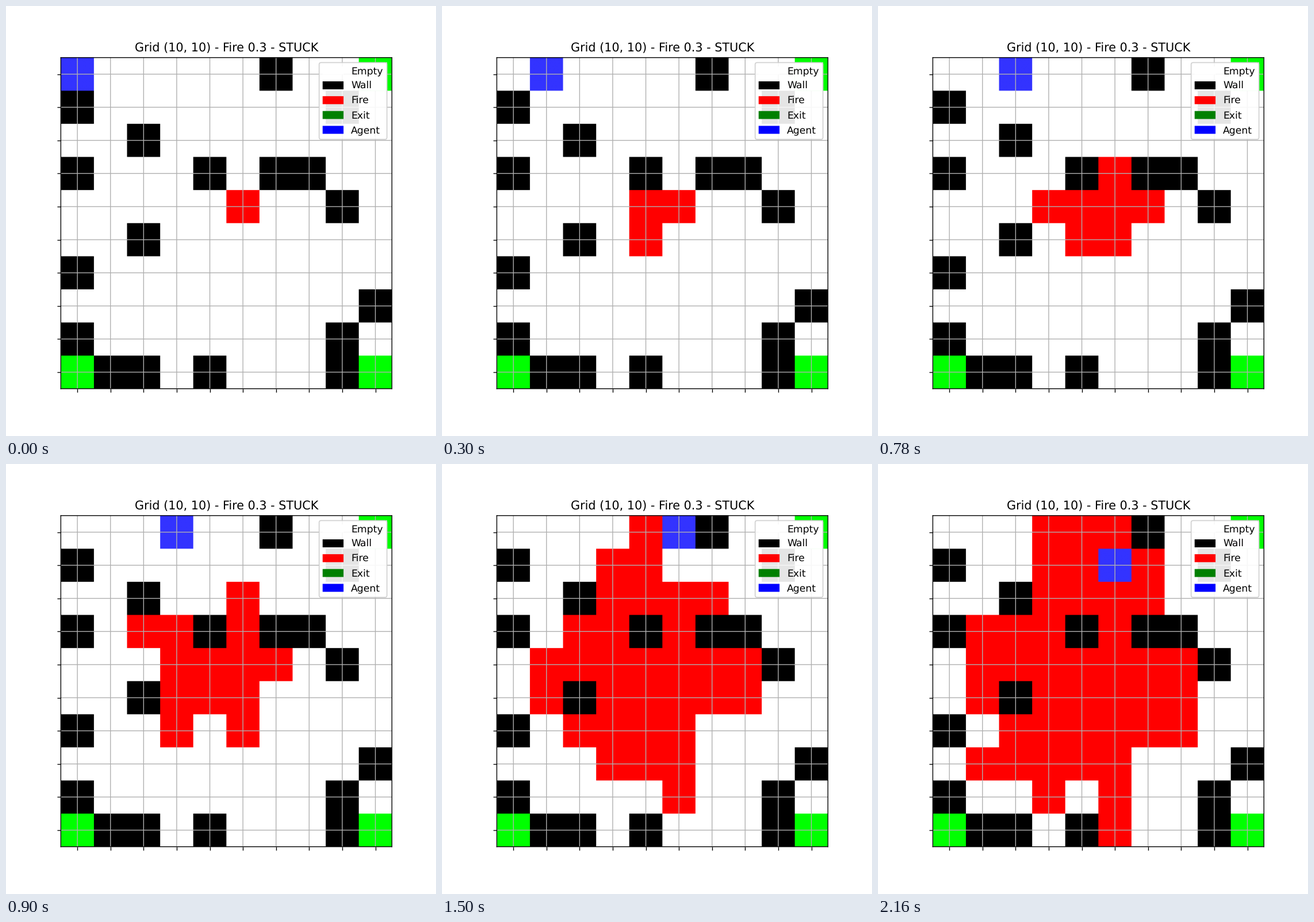
Animation, 748 px wide and 748 px high, one loop 2400 ms. Source, as a matplotlib script:

```python
import numpy as np
import matplotlib.pyplot as plt
from matplotlib.animation import FuncAnimation
from matplotlib.patches import Patch, Rectangle

SIZE, INCHES = 748, 6
STEPS = 7
PAD, SCALE = 2, 50  # margin in cells, samples per cell for soft edges

# '#' wall, 'E' exit, a digit is the step at which the cell catches fire
GRID = [
    "...656#..E",
    "#..5466.#.",
    "..#4434...",
    "#633#2##..",
    ".5421024#.",
    ".5#31245..",
    "#.534366..",
    ".66545...#",
    "#..6.5..#.",
    "E##.#6..#E",
]
N = len(GRID)
EMPTY, WALL, FIRE = (1, 1, 1), (0, 0, 0), (1, 0, 0)
EXIT, AGENT = (0, 1, 0), (0.2, 0.2, 1)


def agent_cell(step):
    """Walk right along the top row, then turn down at column 5."""
    return (0, step) if step <= 5 else (step - 5, 5)


def cell_color(cell, step):
    if cell.isdigit():
        return FIRE if int(cell) <= step else EMPTY
    return {"#": WALL, "E": EXIT}.get(cell, EMPTY)


def render(step):
    img = np.array([[cell_color(c, step) for c in row] for row in GRID], float)
    img[agent_cell(step)] = AGENT
    img = np.pad(img, ((PAD, PAD), (PAD, PAD), (0, 0)), constant_values=1)
    return img.repeat(SCALE, axis=0).repeat(SCALE, axis=1)


plt.rcParams.update({"font.family": "DejaVu Sans", "text.hinting": "none"})
fig, ax = plt.subplots(figsize=(INCHES, INCHES), dpi=SIZE / INCHES)

# The padded board covers the whole figure, so cells keep sub-pixel positions
lo, hi = -0.5 - PAD, N - 0.5 + PAD
board = ax.imshow(render(0), extent=(lo, hi, hi, lo), interpolation="bilinear")
board.set_clip_on(False)
ax.set(xlim=(-0.5, N - 0.5), ylim=(N - 0.5, -0.5))
ax.set_title("Grid (10, 10) - Fire 0.3 - STUCK")
ax.set_xticks(range(N), labels=[])
ax.set_yticks(range(N), labels=[])
ax.grid(True, snap=False)

# The exit does not show through the legend
ax.add_patch(Rectangle((8.5, -0.35), 0.85, 0.85, fc="white", lw=0, zorder=4))

entries = {"Empty": "white", "Wall": "black", "Fire": "red",
           "Exit": "green", "Agent": "blue"}
legend = ax.legend(
    handles=[Patch(color=c, label=name) for name, c in entries.items()],
    loc="upper right", framealpha=0.9, labelspacing=0.54)
for patch in [*legend.get_patches(), legend.get_frame(), *ax.spines.values()]:
    patch.set_snap(False)


def update(frame):
    board.set_data(render(min(frame, STEPS - 1)))
    return [board]


# The last step is held for one extra tick
anim = FuncAnimation(fig, update, frames=STEPS + 1, interval=300,
                     repeat=True, repeat_delay=0, blit=False)
plt.show()
```
